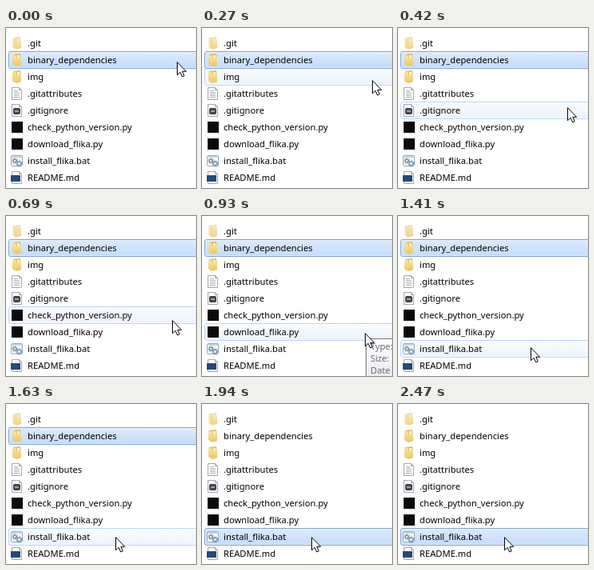
An HTML page with a canvas that plays this animation: 238 by 200 pixels, repeating every 2720 ms.

```html
<!DOCTYPE html>
<html lang="en">
<head>
<meta charset="utf-8">
<title>File list</title>
<style>
html, body { margin: 0; width: 100%; height: 100%; overflow: hidden; background: #fff; }
canvas { display: block; width: 238px; height: 200px; }
</style>
</head>
<body>
<canvas id="stage" width="238" height="200"></canvas>
<script>
const ctx = document.getElementById('stage').getContext('2d');
const LOOP = 2720, STEP = 30, PITCH = 21;
const FONT = '"Segoe UI", "Open Sans", "Noto Sans", sans-serif';

const files = [
  ['.git', y => folder(y, 0.5)],
  ['binary_dependencies', y => folder(y, 1)],
  ['img', y => folder(y, 1)],
  ['.gitattributes', textPage],
  ['.gitignore', settingsPage],
  ['check_python_version.py', scriptTile],
  ['download_flika.py', scriptTile],
  ['install_flika.bat', batchWindow],
  ['README.md', notePage]
];

// Pointer path: time, x, y
const path = [
  [120, 214, 42], [420, 212, 99], [660, 208.5, 127],
  [930, 204, 146], [1230, 194, 161], [1620, 137, 166]
];

const clamp01 = v => Math.max(0, Math.min(1, v));
const ramp = (t, from, to) => clamp01((t - from) / (to - from));

function rect(x, y, w, h, color) {
  ctx.fillStyle = color;
  ctx.fillRect(x, y, w, h);
}

function polygon(points, fill, stroke) {
  ctx.beginPath();
  points.forEach(([x, y]) => ctx.lineTo(x, y));
  ctx.closePath();
  ctx.fillStyle = fill;
  ctx.fill();
  if (stroke) {
    ctx.strokeStyle = stroke;
    ctx.lineWidth = 1;
    ctx.stroke();
  }
}

function shade(y0, y1, top, bottom) {
  const g = ctx.createLinearGradient(0, y0, 0, y1);
  g.addColorStop(0, top);
  g.addColorStop(1, bottom);
  return g;
}

function roundBox(x, y, w, h, r, fill, stroke) {
  ctx.beginPath();
  ctx.roundRect(x, y, w, h, r);
  if (fill) {
    ctx.fillStyle = fill;
    ctx.fill();
  }
  ctx.strokeStyle = stroke;
  ctx.lineWidth = 1;
  ctx.stroke();
}

function faded(alpha, draw) {
  if (alpha <= 0) return;
  ctx.save();
  ctx.globalAlpha = alpha;
  draw();
  ctx.restore();
}

function folder(y, alpha) {
  faded(alpha, () => {
    polygon([[9, y + 1], [18, y], [19, y + 14], [10, y + 15]], '#e3bd62');
    rect(14, y + 2, 3, 10, '#fdf6da');
    polygon([[8, y + 1], [13, y + 3], [13, y + 16], [8, y + 13]],
      shade(y, y + 16, '#fbeaa9', '#ecc968'));
    polygon([[13, y + 6], [19, y + 4], [19, y + 14], [13, y + 16]],
      shade(y + 4, y + 16, '#f9e49b', '#e8c162'));
  });
}

function page(y) {
  polygon([[7.5, y + .5], [16.5, y + .5], [19.5, y + 3.5], [19.5, y + 15.5], [7.5, y + 15.5]],
    '#fdfdfd', '#a3a7ac');
  polygon([[16.5, y + .5], [16.5, y + 3.5], [19.5, y + 3.5]], '#e2e5e8', '#a3a7ac');
}

function textPage(y) {
  page(y);
  for (let i = 0; i < 5; i++) rect(10, y + 4 + i * 2, i ? 7 : 5, 1, '#b3bac2');
}

function settingsPage(y) {
  page(y);
  roundBox(9.5, y + 5.5, 8, 7, 1, '#454b50', '#3b4044');
  rect(11, y + 8, 5, 2, '#9aa4a9');
}

function scriptTile(y) {
  rect(7, y + 1, 14, 14, '#0b0b0b');
}

function gear(x, y, r) {
  ctx.strokeStyle = '#60849d';
  for (const [radius, width, dash] of [[r, 1.4, [1.4, 1.1]], [r - 1, 1, []]]) {
    ctx.beginPath();
    ctx.arc(x, y, radius, 0, Math.PI * 2);
    ctx.lineWidth = width;
    ctx.setLineDash(dash);
    ctx.stroke();
  }
  ctx.setLineDash([]);
}

function batchWindow(y) {
  roundBox(6.5, y + 1.5, 14, 13, 1, '#f5f9fb', '#98abba');
  rect(7, y + 2, 13, 2, '#c5d8e5');
  gear(11, y + 8, 2.8);
  gear(16.5, y + 11.5, 3.2);
}

function notePage(y) {
  page(y);
  rect(6, y + 5, 12, 8, '#234a7d');
}

function rowBox(row, top, bottom, border) {
  const y = 8 + row * PITCH;
  roundBox(3.5, y + .5, 242, 21, 2.5, shade(y, y + 22, top, bottom), border);
  roundBox(4.5, y + 1.5, 240, 19, 1.5, null, 'rgba(255,255,255,.5)');
}

const hoverRow = row => rowBox(row, '#fafcfe', '#ebf3fd', '#b8d6fb');
const selectedRow = row => rowBox(row, '#dcebfc', '#c1dbfc', '#7da2ce');

function label(text, x, y, color, size = 11.2) {
  ctx.font = size + 'px ' + FONT;
  ctx.fillStyle = color;
  ctx.fillText(text, x, y);
}

function tooltip() {
  roundBox(205.5, 153.5, 160, 62, 2, shade(153, 215, '#ffffff', '#e4e5f0'), '#767676');
  ['Type: Python File', 'Size: 2.06 KB', 'Date modified'].forEach((line, i) =>
    label(line, 211, 167 + i * 15, '#6b6b6b'));
}

function pointer(x, y) {
  const shape = [[0, 0], [0, 16], [3.7, 12.6], [6.2, 18.2], [8.8, 17.1], [6.4, 11.6], [11.2, 11.6]];
  polygon(shape.map(([dx, dy]) => [x + .5 + dx, y + .7 + dy]), '#fff', '#000');
}

// Monotone cubic through the path, so the pointer never overshoots
function along(t, axis) {
  const last = path.length - 1;
  if (t <= path[0][0]) return path[0][axis];
  if (t >= path[last][0]) return path[last][axis];
  const slope = i => (path[i + 1][axis] - path[i][axis]) / (path[i + 1][0] - path[i][0]);
  const tangent = i => {
    if (i === 0 || i === last) return 0;
    const a = slope(i - 1), b = slope(i);
    return 2 * a * b / (a + b);
  };
  const i = path.findIndex(p => p[0] > t) - 1;
  const a = path[i], b = path[i + 1], span = b[0] - a[0], u = (t - a[0]) / span;
  const s = u * u * (3 - 2 * u);
  return a[axis] + (b[axis] - a[axis]) * s
    + span * u * (1 - u) * ((1 - u) * tangent(i) - u * tangent(i + 1));
}

function draw(time) {
  const t = Math.floor(time / STEP) * STEP;
  const nudge = time < 2340 ? 0 : Math.min(4, 1 + Math.floor((time - 2340) / 43.3));
  const x = Math.round(along(t, 1)) - nudge;
  const y = Math.round(along(t, 2));
  const hovered = Math.floor((y - 8) / PITCH);
  const picked = time < 1840 ? 0 : time < 1940 ? .5 : 1;

  rect(0, 0, 238, 200, '#fff');
  if (hovered !== 1) hoverRow(hovered);
  faded(1 - picked, () => selectedRow(1));
  faded(picked, () => selectedRow(7));

  files.forEach(([name, icon], i) => {
    icon(11 + i * PITCH);
    label(name, 27, 23 + i * PITCH, '#000');
  });

  faded(ramp(t, 810, 930) * (1 - ramp(t, 1260, 1410)), tooltip);
  pointer(x, y);
}

const start = performance.now();
function tick() {
  draw((performance.now() - start) % LOOP);
  requestAnimationFrame(tick);
}
tick();
</script>
</body>
</html>
```
